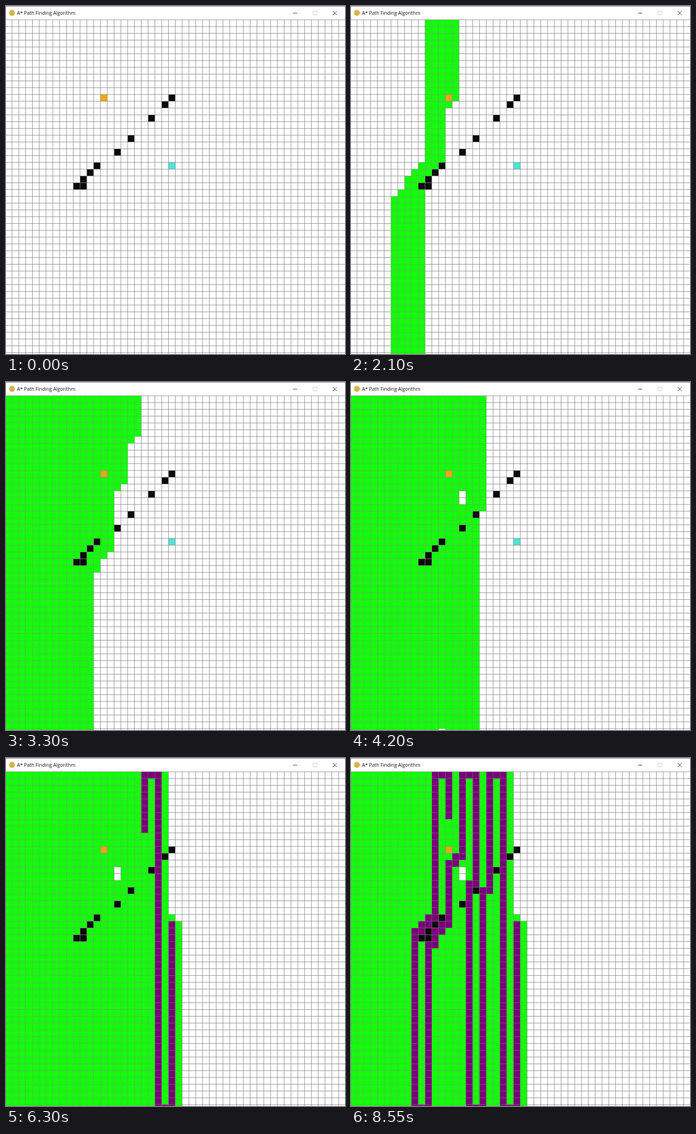
An HTML page for the animation above (8700 ms loop, 738 by 759 pixels).

```html
<!DOCTYPE html>
<html lang="en">
<head>
<meta charset="utf-8">
<title>A* Path Finding Algorithm</title>
<style>
  html, body { margin: 0; width: 100%; height: 100%; overflow: hidden; background: #fff; }
  svg { display: block; width: 738px; height: 759px; }
  text { font: 10.5px "Open Sans", "Noto Sans", sans-serif; fill: #111; }
</style>
</head>
<body>
<svg viewBox="0 0 738 759">
  <rect width="738" height="759" fill="#fff"/>
  <path id="open" fill="#14ff0a"/>
  <path id="route" fill="#780078"/>
  <path id="walls" fill="#0a0a0a"/>
  <path id="goal" fill="#4be6d6"/>
  <path id="start"/>
  <path id="grid" fill="none" stroke="#848484"/>
  <use href="#open" opacity=".3"/>
  <use href="#route" opacity=".3"/>
  <rect width="738" height="1.6" fill="#a3a3a3"/>
  <circle cx="13" cy="15" r="6.5" fill="#d8b545"/>
  <text x="24" y="19">A* Path Finding Algorithm</text>
  <g fill="none" stroke="#222">
    <path d="M625 15.5h9"/>
    <path d="M668.5 11.5h8v8h-8z" stroke="#ccc"/>
    <path d="M711.3 11.3l8.8 8.8M720.1 11.3l-8.8 8.8"/>
  </g>
</svg>
<script>
const N = 50, STEP = 14.815, X0 = -1.8, Y0 = 30;
const LOOP = 8700, TICK = 150;
const el = id => document.getElementById(id);
const key = (c, r) => c * N + r;
const colOf = k => Math.floor(k / N), rowOf = k => k % N;
const xOf = c => (X0 + c * STEP).toFixed(2), yOf = r => (Y0 + r * STEP).toFixed(2);
const cell = k => {
  const c = colOf(k), r = rowOf(k);
  return `M${xOf(c)} ${yOf(r)}H${xOf(c + 1)}V${yOf(r + 1)}H${xOf(c)}z`;
};
const cells = list => list.map(cell).join("");

const start = key(14, 11), goal = key(24, 21);
const walls = [[24, 11], [23, 12], [21, 14], [18, 17], [16, 19], [13, 21],
  [12, 22], [11, 23], [10, 24], [11, 24]].map(p => key(...p));

// Depth-first search: up is tried first, then down, left and right.
function search() {
  const parent = new Map([[start, -1]]), stack = [start];
  const open = [], steps = [];
  while (stack.length) {
    const k = stack.pop();
    if (k === goal) break;
    const before = open.length;
    for (const [dc, dr] of [[1, 0], [-1, 0], [0, 1], [0, -1]]) {
      const c = colOf(k) + dc, r = rowOf(k) + dr, next = key(c, r);
      if (c < 0 || r < 0 || c >= N || r >= N) continue;
      if (parent.has(next) || walls.includes(next)) continue;
      parent.set(next, k);
      open.push(next);
      stack.push(next);
    }
    if (open.length > before) steps.push({ k, count: open.length });
  }
  const route = [];
  for (let k = parent.get(goal); k !== start; k = parent.get(k)) route.push(k);
  return { open, steps, route };
}

const { open, steps, route } = search();
const stepAt = (c, r) => steps.findIndex(s => s.k === key(c, r)) + 1;

// Pace of both phases: [time, steps done]
const searchPace = [[1700, 0], [2100, stepAt(7, 26)], [3300, stepAt(18, 5)],
  [4200, stepAt(13, 47)], [5400, stepAt(24, 26)], [5450, steps.length]];
const routePace = [[5450, 0], [7200, 184], [8550, 301], [8700, route.length]];

function progress(pace, t) {
  if (t <= pace[0][0]) return 0;
  for (let i = 1; i < pace.length; i++) {
    const [t0, a] = pace[i - 1], [t1, b] = pace[i];
    if (t <= t1) return Math.round(a + (b - a) * (t - t0) / (t1 - t0));
  }
  return pace[pace.length - 1][1];
}

let lines = "";
for (let i = 0; i <= N; i++) lines += `M${xOf(i)} ${Y0}V759M0 ${yOf(i)}H738`;
el("grid").setAttribute("d", lines);
el("walls").setAttribute("d", cells(walls));
el("goal").setAttribute("d", cell(goal));
el("start").setAttribute("d", cell(start));

let shown = -1;
function draw(now) {
  const t = Math.floor(now % LOOP / TICK) * TICK;
  if (t === shown) return;
  shown = t;
  const done = progress(searchPace, t);
  const seen = open.slice(0, done ? steps[done - 1].count : 0);
  const traced = new Set(route.slice(0, progress(routePace, t)));
  el("open").setAttribute("d", cells(seen.filter(k => !traced.has(k))));
  el("route").setAttribute("d", cells([...traced]));
  el("goal").setAttribute("visibility", seen.includes(goal) ? "hidden" : "visible");
  el("start").setAttribute("fill", done ? "#eca31a" : "#f2aa0a");
}
function loop() {
  draw(performance.now());
  requestAnimationFrame(loop);
}
loop();
</script>
</body>
</html>
```
